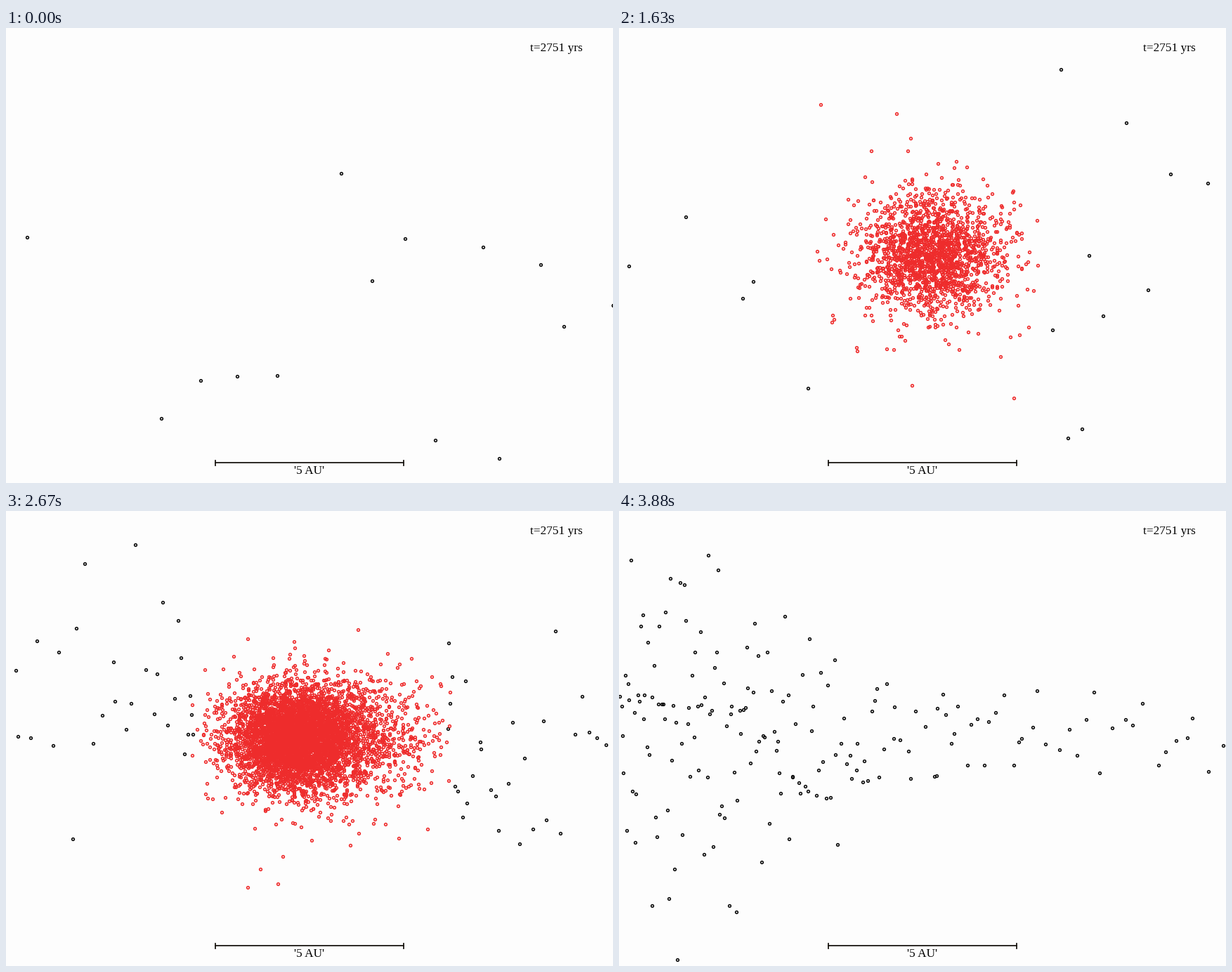
A matplotlib script that plays this animation: 864x648 px, repeating every 3960 ms.

```python
import numpy as np
import matplotlib.pyplot as plt
from matplotlib.animation import FuncAnimation

W, H = 864, 648
FRAMES, INTERVAL = 99, 40
STEP_MS = 1000 / 24          # one slice of the cloud per step
FIRST_REST, LAST_REST, END = 9, 12, 90
MID = 448                    # middle of the bound zone
RED, BLACK, PAPER = "#ee2c2c", "#0c0c0c", "#fdfdfd"


def key(step, *values):
    """Ease a parameter between five moments of the sweep."""
    return np.interp(step, (0, 30, 55, 75, END), values)


def half_width(step):
    """Half chord of the round bound zone cut by this slice."""
    return 190 * np.sqrt(max(0, 1 - ((step - 54) / 32.5) ** 2))


def blob(rng, count, center, spread):
    return rng.normal(center, spread, (int(round(count)), 2))


def bound(rng, step, half):
    """Dense core, wider wing and a few far points, cut to the zone."""
    rise = 10 if step < 56.5 else 8
    total = 8500 * np.exp(-((step - 56.5) / rise) ** 2 / 2)
    wing = key(step, .1, .1, .22, .45, .45)
    flat = np.interp(step, (30, 45), (54, 32))
    core_x = key(step, 455, 455, 428, 388, 388)
    pts = np.vstack([
        blob(rng, total * (1 - wing), (core_x, 323),
             (key(step, 50, 50, 47, 42, 42), flat + key(step, 0, 0, 0, 6, 6))),
        blob(rng, total * wing, (core_x + key(step, 0, 0, 14, 75, 75), 323),
             (key(step, 55, 55, 78, 62, 62), key(step, 60, 60, 48, 38, 38))),
        blob(rng, min(12, total * .06), (440, 320), (95, 130)),
    ])
    return pts[abs(pts[:, 0] - MID) < half + 4]


def stream(rng, count, start, stop, power, y, spread, taper):
    """Unbound points from the zone's rim out to the side of the stage."""
    n = int(round(count))
    reach = ((np.arange(n) + rng.random(n)) / max(n, 1)) ** power
    width = spread * (1 - taper * (1 - reach))
    return np.column_stack([start + (stop - start) * reach,
                            rng.normal(y, width)])


def unbound(rng, step, half):
    left = stream(rng, key(step, 6, 4, 6, 58, 148), MID - half, 0,
                  key(step, 1, 1.2, 1.2, 2.1, .65),
                  key(step, 390, 350, 260, 315, 320),
                  key(step, 150, 140, 100, 102, 118),
                  key(step, 0, 0, 0, 0, .6))
    right = stream(rng, key(step, 9, 9, 12, 50, 38), MID + half, W,
                   key(step, 1, 2, 1.4, 2, 1.5),
                   key(step, 390, 390, 325, 322, 318),
                   key(step, 130, 140, 85, 72, 38),
                   key(step, 0, 0, 0, .4, 0))
    return np.vstack([left, right])


def step_of(frame):
    step = int((frame * INTERVAL + 30) / STEP_MS)
    if FIRST_REST <= step <= LAST_REST:
        return FIRST_REST
    return min(step, END)


fig = plt.figure(figsize=(W / 72, H / 72), dpi=72, facecolor=PAPER)
ax = fig.add_axes([0, 0, 1, 1])
ax.set_xlim(0, W)
ax.set_ylim(H, 0)
ax.axis("off")

ring = dict(ls="", marker="o", ms=3.7, mew=1.6, mfc="none")
black, = ax.plot([], [], mec=BLACK, zorder=2, **ring)
red, = ax.plot([], [], mec=RED, zorder=3, **ring)

bar = dict(color="#1a1612", lw=1.8)
ax.plot([298, 566], [619, 619], **bar)
for x in (298, 566):
    ax.plot([x, x], [615.5, 622.5], **bar)
font = dict(family="Liberation Serif", size=17.3, color="black", va="baseline")
ax.text(746, 33, "t=2751 yrs", ha="left", **font)
ax.text(432, 635, "'5 AU'", ha="center", **font)


def draw(frame):
    step = step_of(frame)
    rng = np.random.default_rng(100 + step)
    half = half_width(step)
    red.set_data(*bound(rng, step, half).T)
    black.set_data(*unbound(rng, step, half).T)
    return red, black


anim = FuncAnimation(fig, draw, frames=FRAMES, interval=INTERVAL,
                     init_func=lambda: draw(0), repeat=True, repeat_delay=0)
plt.show()
```
